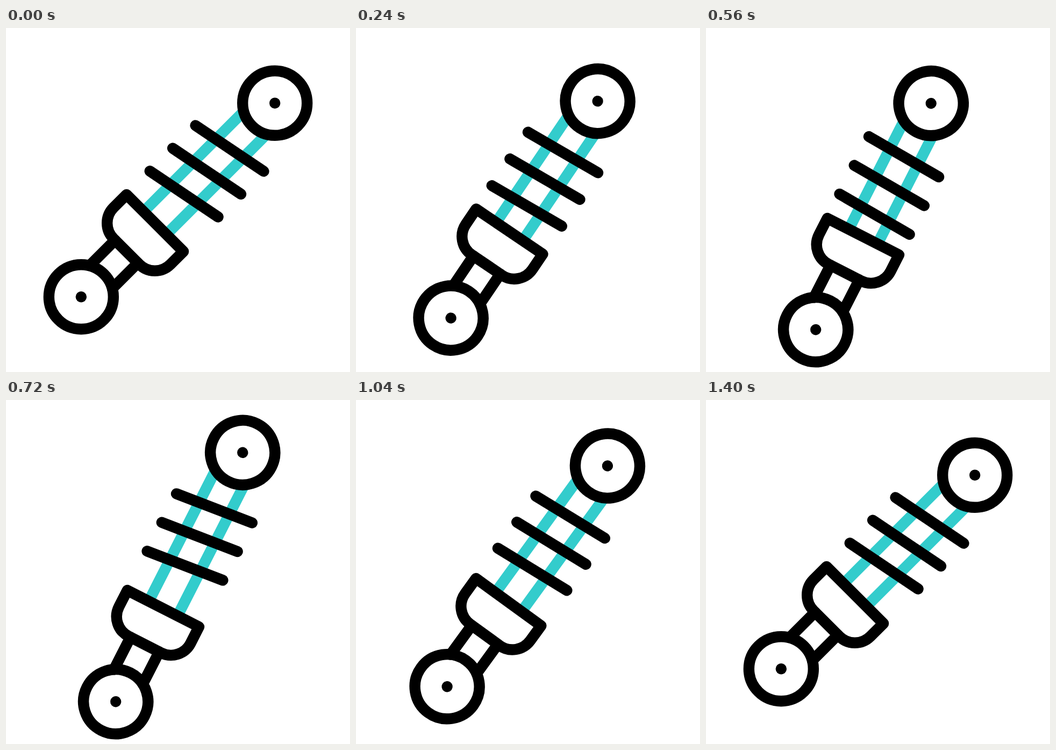
These frames come from a looping animation (640 by 640 pixels, 1.48 s). An HTML page:

```html
<!DOCTYPE html>
<html lang="en">
<head>
<meta charset="utf-8">
<title>Shock absorber</title>
<style>
  html, body { margin: 0; width: 100%; height: 100%; overflow: hidden; background: #fff; }
  svg { display: block; width: 100%; height: 100%; }
  .line { fill: none; stroke: #000; stroke-width: 20.4; stroke-linecap: round; stroke-linejoin: round; }
  .rod { fill: none; stroke: #3cc; stroke-width: 20.4; }
</style>
</head>
<body>
<svg viewBox="0 0 640 640">
  <g id="shock">
    <!-- upright drawing, origin at the lower eye -->
    <g transform="translate(139.8 500.2) rotate(45)">
      <path id="rods" class="rod"/>
      <path id="coils" class="line"/>
      <path class="line" d="M-30-52V-119.2M30-52V-119.2"/>
      <path class="line" d="M-74.8-194.3H74.8V-160.2A41 41 0 0 1 33.8-119.2H-33.8A41 41 0 0 1-74.8-160.2Z"/>
      <circle class="line" r="60"/>
      <circle r="10.2"/>
      <g id="eye">
        <circle class="line" r="60"/>
        <circle r="10.2"/>
      </g>
    </g>
  </g>
</svg>
<script>
const LOOP = 1480, STEP = 40;
const LENGTH = 509.7, PIVOT = '364.4 327.5';

// [time in ms, value]; eased in and out between neighbours
const TILT = [[80, 0], [360, -18], [840, -18], [1240, 0]];
const times = [80, 440, 880, 1165, 1400];
const track = (...values) => values.map((v, i) => [times[i], v]);
const EYE = track(0, -54, 38, -29.8, 0);
const COIL_LEFT = track(0, -22, 38, -13, 0);
const COIL_RIGHT = track(0, -67.5, 38, -42.4, 0);

const $ = id => document.getElementById(id);
const shock = $('shock'), rods = $('rods'), coils = $('coils'), eye = $('eye');

function at(keys, t) {
  if (t <= keys[0][0]) return keys[0][1];
  for (let i = 1; i < keys.length; i++) {
    const [t0, a] = keys[i - 1], [t1, b] = keys[i];
    if (t < t1) {
      const p = (t - t0) / (t1 - t0);
      return a + (b - a) * p * p * (3 - 2 * p);
    }
  }
  return keys[keys.length - 1][1];
}

function draw(t) {
  const top = LENGTH + at(EYE, t);
  const left = 315.9 + at(COIL_LEFT, t);
  const right = 345.3 + at(COIL_RIGHT, t);

  shock.setAttribute('transform', `rotate(${at(TILT, t)} ${PIVOT})`);
  eye.setAttribute('transform', `translate(0 ${-top})`);
  rods.setAttribute('d', [-30, 30].map(x => `M${x} -194.3V${52 - top}`).join(''));
  coils.setAttribute('d', [-60, 0, 60].map(y => `M-75 ${y - left}L75 ${y - right}`).join(''));
}

const start = performance.now();
function tick() {
  const t = (performance.now() - start) % LOOP;
  draw(Math.floor(t / STEP) * STEP);
  requestAnimationFrame(tick);
}
tick();
</script>
</body>
</html>
```
